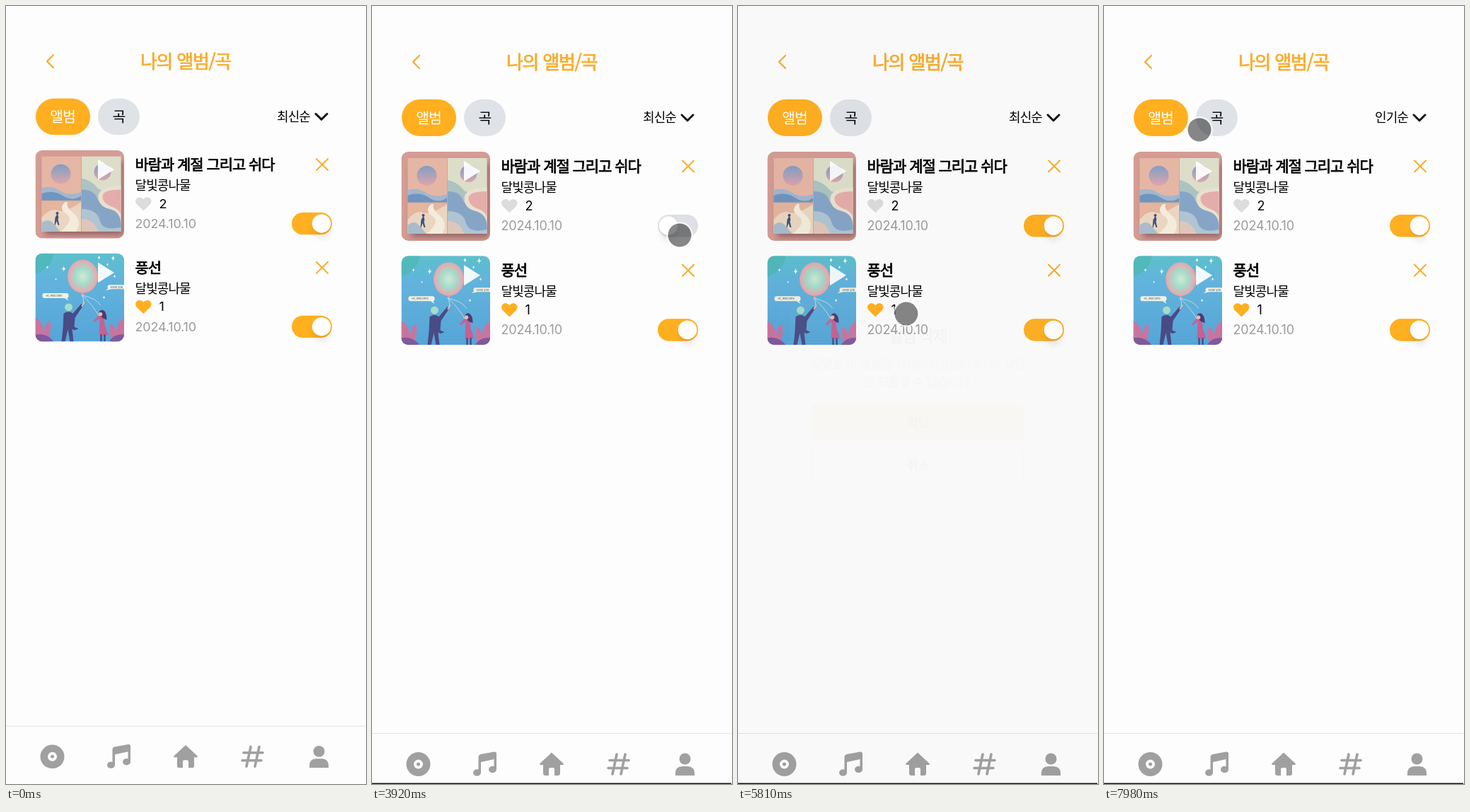
An HTML page for the animation above (8 s loop, 509 by 1100 pixels).

```html
<!DOCTYPE html>
<html lang="ko">
<head>
<meta charset="utf-8">
<style>
  html, body { margin: 0; width: 100%; height: 100%; overflow: hidden; background: #fdfdfd; }
  svg { display: block; }
  text { font-family: "Noto Sans CJK KR", "Noto Sans CJK", sans-serif; letter-spacing: -.05em; fill: currentColor; }
  .num { font: 18px Inter, sans-serif; letter-spacing: -.01em; }
  .mid { text-anchor: middle; }
  .semi { stroke: currentColor; stroke-width: .75; }
  .line { fill: none; stroke-linecap: round; stroke-linejoin: round; }
  .tiny { font: 4px Inter, sans-serif; letter-spacing: 0; color: #456; }
</style>
</head>
<body>
<svg width="509" height="1100" viewBox="0 0 509 1100">
  <defs>
    <clipPath id="round"><rect width="125.5" height="126" rx="10"/></clipPath>
    <linearGradient id="sun" x2="0" y2="1">
      <stop stop-color="#7f9fc6"/><stop offset="1" stop-color="#dfa5ab"/>
    </linearGradient>
    <linearGradient id="sky" x2="0" y2="1">
      <stop stop-color="#5cc0cc"/><stop offset=".3" stop-color="#62b3dc"/><stop offset="1" stop-color="#55a5d8"/>
    </linearGradient>
    <radialGradient id="balloon" cx=".5" cy=".5" r=".62">
      <stop stop-color="#d3ead2"/><stop offset=".4" stop-color="#a3dccb"/>
      <stop offset=".75" stop-color="#e8a9b0"/><stop offset="1" stop-color="#4fb5b4"/>
    </radialGradient>
    <filter id="soft" x="-50%" y="-50%" width="200%" height="200%"><feGaussianBlur stdDeviation="4"/></filter>

    <g id="cover0" clip-path="url(#round)">
      <rect width="126" height="126" fill="#d49c94"/>
      <rect x="14" y="16" width="110" height="105" fill="#7d4f51" opacity=".7" filter="url(#soft)"/>
      <rect x="9" y="9" width="112" height="107" fill="#e6b6a5"/>
      <circle cx="36" cy="34" r="14" fill="url(#sun)"/>
      <path d="M9 54q14-4 26 4t30 2v12H9z" fill="#a3b6cd"/>
      <path d="M9 62q16-6 30 3t26 0v7H9z" fill="#6f95c0"/>
      <path d="M9 72h56v44H9z" fill="#e5b59d"/>
      <path d="M9 96q12-14 22-10t34-12v42H9z" fill="#ead6c0"/>
      <path d="M42 74q-10 9 2 17t-8 25h22q8-16-4-26t-8-16z" fill="#f3ecdc"/>
      <path d="M9 104q9-8 16 0t10 12H9z" fill="#a9bccb"/>
      <path d="M31 91q3 4 1 8l2 8h-2l-2-6-2 6h-1l1-11z" fill="#42527e"/>
      <circle cx="31" cy="90" r="2" fill="#42527e"/>
      <path d="M65 9h56v107H65z" fill="#dcdec9"/>
      <circle cx="95" cy="31" r="12" fill="url(#sun)"/>
      <path d="M65 40q14 3 22 13t34-3v66H65z" fill="#adc3c2"/>
      <path d="M65 56q18 0 22 12t34 16v32H65z" fill="#86a5c6"/>
      <path d="M121 50q-32 2-32 16t16 18 16 22z" fill="#e9e0cf"/>
      <path d="M121 56q-26 0-26 10t14 15 12 18z" fill="#e5adaa"/>
      <path d="M65 84q22 0 26 16t30 10v6H65z" fill="#b0c4d2"/>
      <path d="M65 98q18 0 24 18H65z" fill="#dfc6ba"/>
      <path d="M65 9v107M9 72h56" stroke="#c8a99b"/>
    </g>

    <g id="cover1" clip-path="url(#round)">
      <rect width="126" height="126" fill="url(#sky)"/>
      <path d="M0 0h26q-2 20-26 30z" fill="#49b8ad" opacity=".6"/>
      <path d="M66 60q4 8 1 14M66 60q14 12 25 31M66 60q20 4 26 14" class="line" stroke="#d8f1ec" stroke-width=".7"/>
      <ellipse cx="67" cy="33" rx="21.5" ry="24" fill="url(#balloon)"/>
      <path d="M64 60l3-4 3 4z" fill="#e89ba4"/>
      <g id="stars" fill="#fff"></g>
      <g fill="#f0f1e4"><rect x="10" y="57" width="37" height="7" rx="3"/><rect x="102" y="45" width="30" height="6" rx="3"/>
        <path d="M40 63l7 5-3-6zM104 49l-5 4 8-2z"/></g>
      <text x="15" y="62" class="tiny">Hi, welcome</text>
      <text x="106" y="49.500" class="tiny">Hello you</text>
      <g fill="#c9749f">
        <path d="M0 92q10 4 13 20 0-12 8-16 2 14-3 30H0z"/><path d="M126 92q-10 4-12 20-2-10-8-12-2 14 2 26h18z"/>
      </g>
      <path d="M0 116q16-3 26 10H0zM126 116q-14-2-22 10h22z" fill="#7e5a9c"/>
      <path d="M40 86q7-5 13 0l12-14 3 2-12 18-1 13 6 3-6 2-3-2 2 18h-5l-3-17-4 17h-5l2-19z" fill="#494b86"/>
      <circle cx="47" cy="77" r="5.500" fill="#a5ddc9"/>
      <path d="M66 75l3-5" class="line" stroke="#efb1a9" stroke-width="2"/>
      <path d="M91 93l-7 5-2-1 7-8q6-3 8 1l1 12 5 15H90z" fill="#c95f92"/>
      <path d="M90 88q-1-7 5-7 6 2 6 14l-5-2z" fill="#4a3a78"/>
      <circle cx="92" cy="87" r="2.800" fill="#f0b8a8"/>
      <path d="M93 116v10M98 116v10" stroke="#494b86" stroke-width="2.500"/>
    </g>
    <path id="heart" d="M0 10L-9.200 1.100C-15.400-6-5.800-13.500 0-6.200 5.800-13.500 15.400-6 9.200 1.100z"/>
  </defs>

  <g id="page">
    <rect width="509" height="1112" fill="#fdfdfd"/>
    <path d="M67 70l-9 9 9 9" class="line" stroke="#f9ab2b" stroke-width="2.200"/>
    <text x="254" y="88.500" font-size="26" class="mid semi" color="#f9ab2b">나의 앨범/곡</text>
    <rect x="42" y="132" width="77" height="52" rx="26" fill="#ffaf20"/>
    <rect x="130" y="132" width="59" height="52" rx="26" fill="#dfe3e8"/>
    <text x="80" y="165.500" font-size="20.500" class="mid" color="#fff">앨범</text>
    <text x="159.500" y="165.500" font-size="20.500" class="mid">곡</text>
    <text id="sort" x="383" y="164.300" font-size="18"></text>
    <path d="M438 154l8 8 8-8" class="line" stroke="#111" stroke-width="3"/>
    <g id="rows"></g>
    <path d="M0 1028.500h508" stroke="#dbe3ee"/>
    <g fill="#a0a0a0">
      <circle cx="65.500" cy="1072" r="17"/>
      <circle cx="65.500" cy="1072" r="6.500" fill="#fdfdfd"/>
      <circle cx="65.500" cy="1072" r="2.500"/>
      <ellipse cx="148.500" cy="1084" rx="5.500" ry="4.700"/><ellipse cx="170.500" cy="1079.500" rx="5.500" ry="4.700"/>
      <path d="M150.500 1084V1062q0-3 3-4l19-3.500q3.500-.5 3.500 2.500v22.500h-3.500v-14.500l-18.500 4v15z"/>
      <path d="M254 1055.500L270.500 1071q1 2-1 2H266v12q0 3-3 3h-5v-9q0-2-2-2h-4q-2 0-2 2v9h-5q-3 0-3-3v-12h-3.500q-2 0-1-2z"/>
      <path d="M346 1058l-6 28M358 1058l-6 28M336 1066.500h27M334 1077.500h27" class="line" stroke="#a0a0a0" stroke-width="3.600"/>
      <circle cx="442.500" cy="1064.500" r="8"/>
      <path d="M429 1088v-3q0-10 10-10h7q10 0 10 10v3z"/>
    </g>
  </g>
  <rect id="edge" y="1098.600" width="508" height="1.400" fill="#111"/>
  <rect id="dim" width="508" height="1100"/>
  <g id="modal">
    <rect x="66" y="412" width="377" height="300" rx="20" opacity=".25" filter="url(#soft)"/>
    <rect x="64" y="404.500" width="381" height="302.500" rx="20" fill="#fdfdfd"/>
    <g class="mid">
      <text x="254" y="464.500" font-size="23.500" class="semi" color="#111">앨범 삭제</text>
      <g font-size="18.500" color="#74747c">
        <text x="254.500" y="504.500">정말로 이 앨범을 삭제하시겠습니까? 이 작업</text>
        <text x="254.500" y="531">은 되돌릴 수 없습니다.</text>
      </g>
      <rect x="96" y="558" width="316.500" height="52.500" rx="8" fill="#ffaf20"/>
      <rect x="96.700" y="622.200" width="315" height="51.500" rx="8" fill="none" stroke="#f9ab2b" stroke-width="1.500"/>
      <text x="254" y="591" font-size="18.500">확인</text>
      <text x="254" y="654.500" font-size="18.500">취소</text>
    </g>
  </g>
  <g id="cursor">
    <circle r="17.500" fill="none" stroke="#fff" stroke-opacity=".7" stroke-width="2.500"/>
    <circle r="16.500" fill="#111" fill-opacity=".5"/>
  </g>
</svg>
<script>
const LOOP = 8000;
const $ = id => document.getElementById(id);
const set = (el, attrs) => { for (const k in attrs) el.setAttribute(k, attrs[k]); };
const clamp = v => Math.max(0, Math.min(1, v));
const ramp = (t, start, ms) => clamp((t - start) / ms);
const easeOut = k => k * (2 - k);

const stars = [[17, 20, 3], [40, 22, 5], [90, 6, 4], [110, 7, 5], [102, 16, 3], [29, 37, 2], [112, 33, 3], [97, 63, 3]];
$('stars').innerHTML = stars.map(([x, y, r]) => {
  const a = r * .75;
  return `<path d="M${x} ${y - r}q0 ${r} ${a} ${r}q${-a} 0 ${-a} ${r}q0 ${-r} ${-a} ${-r}q${a} 0 ${a} ${-r}"/>`;
}).join('');

const albums = [
  { title: '바람과 계절 그리고 쉬다', likes: 2, heart: '#dcdcde' },
  { title: '풍선', likes: 1, heart: '#ffaf20' }
];
$('rows').innerHTML = albums.map(({ title, likes, heart }, i) => `
  <g transform="translate(0 ${206 + i * 147.2})">
    <use href="#cover${i}" x="41.500"/>
    <path d="M130 13v29l23-14.500z" fill="#fff" opacity=".92"/>
    <text x="182.500" y="28.300" font-size="21" class="semi">${title}</text>
    <text x="182.500" y="56.500" font-size="18">달빛콩나물</text>
    <use href="#heart" x="194.300" y="76.300" fill="${heart}"/>
    <text x="216.500" y="82.500" class="num">${likes}</text>
    <text x="182.500" y="111.300" class="num" color="#9b9b9f">2024.10.10</text>
    <path d="M439 12.500l16 16m0-16l-16 16" class="line" stroke="#f9ab2b" stroke-width="2"/>
    <rect id="track${i}" x="404" y="89" width="57" height="31.500" rx="15.750" fill="#ffaf20"/>
    <g id="knob${i}" transform="translate(446 104.700)">
      <circle cy="10" r="12" opacity=".07" filter="url(#soft)"/>
      <circle r="13.200" fill="#fff"/>
    </g>
  </g>`).join('');

// Cursor stops: time, x, y
const path = [
  [1140, 240, 500], [1940, 194, 284], [1970, 194, 284], [2060, 205, 321], [2690, 300, 400],
  [2870, 300, 400], [3670, 435, 324], [4150, 435, 324], [4490, 447, 228], [4640, 447, 228],
  [4730, 443, 281], [5280, 320, 648], [5620, 320, 648], [6390, 131, 158], [6430, 131, 158],
  [7230, 425, 158], [7320, 425, 158], [7980, 135, 175]
];
function cursorAt(t) {
  const i = path.findIndex(p => p[0] > t);
  if (i < 1) return (i ? path.at(-1) : path[0]).slice(1);
  const [a, b] = [path[i - 1], path[i]];
  const k = easeOut((t - a[0]) / (b[0] - a[0]));
  return [1, 2].map(n => a[n] + (b[n] - a[n]) * k);
}

function draw(t) {
  const settled = t >= 40;
  set($('page'), { transform: `scale(1 ${settled ? 1 : .99})` });
  set($('edge'), { opacity: +settled });
  $('sort').textContent = t < 7200 ? '최신순' : '인기순';

  const off = easeOut(ramp(t, 3720, 150)) - easeOut(ramp(t, 4150, 150));
  const mix = (a, b) => a + (b - a) * off;
  set($('track0'), { fill: `rgb(${mix(255, 222)},${mix(175, 224)},${mix(32, 229)})` });
  set($('knob0'), { transform: `translate(${mix(446, 419)} 104.700)` });

  const open = easeOut(ramp(t, 4693, 200)) - easeOut(ramp(t, 5640, 200));
  const scale = .95 + .05 * open;
  set($('dim'), { opacity: .79 * open });
  set($('modal'), {
    opacity: open,
    transform: `translate(254.500 ${555.5 + 6 * (1 - open)}) scale(${scale}) translate(-254.500 -555.500)`
  });

  const [x, y] = cursorAt(t);
  set($('cursor'), { transform: `translate(${x} ${y})`, opacity: ramp(t, 1140, 100) });
}

const start = performance.now();
function tick() {
  draw((performance.now() - start) % LOOP);
  requestAnimationFrame(tick);
}
tick();
</script>
</body>
</html>
```
